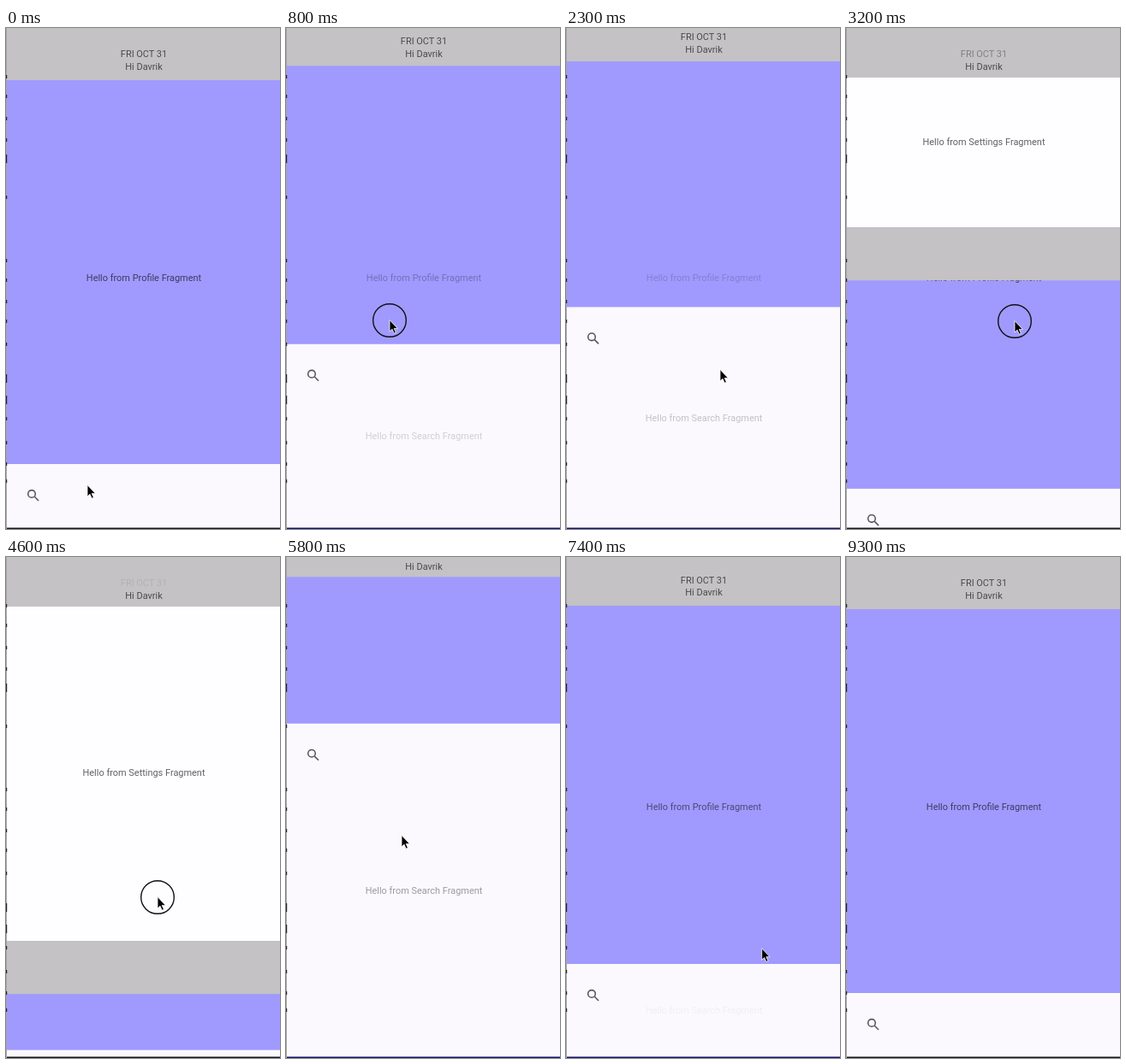
These frames come from a looping animation (320 px wide and 586 px high, 9700 ms). An HTML page:

```html
<!DOCTYPE html>
<html lang="en">
<head>
<meta charset="utf-8">
<title>Sliding panels</title>
<style>
  html, body { margin: 0; width: 100%; height: 100%; overflow: hidden; background: #fbf9fd; }
  svg { display: block; width: 320px; height: 586px; }
  text { font: 10.95px Roboto, sans-serif; text-anchor: middle; fill: #000; fill-opacity: .62; }
</style>
</head>
<body>
<svg viewBox="0 0 320 586">
  <rect width="320" height="586" fill="#a09aff"/>
  <text id="profileText" x="161" y="296">Hello from Profile Fragment</text>

  <g id="settings">
    <rect id="settingsSheet" width="320" fill="#fefdff"/>
    <text id="settingsText" x="161">Hello from Settings Fragment</text>
  </g>
  <rect id="handle" width="320" height="62" fill="#c4c2c4"/>
  <rect id="headerBar" width="320" height="58" fill="#c4c2c4"/>
  <g id="headerText">
    <text id="date" x="161" y="34.3">FRI OCT 31</text>
    <text x="161" y="49">Hi Davrik</text>
  </g>

  <g id="search">
    <rect width="320" height="600" fill="#fbf9fd"/>
    <g transform="translate(22.6 27.5) scale(.78)" fill="none" stroke="#58575a" stroke-width="2">
      <circle cx="9.5" cy="9.5" r="5.5"/>
      <path d="M13.8 13.8L19.8 19.8"/>
    </g>
  </g>
  <text id="searchText" x="161">Hello from Search Fragment</text>

  <rect id="bottomEdge" y="584.5" width="320" height="1.5"/>
  <rect width="1" height="586" fill="#a5a4a8"/>
  <g id="edgeMarks" fill="#222"></g>

  <g id="cursor">
    <circle id="press" r="19.3" fill="none" stroke="#111" stroke-width="1.4"/>
    <path d="M0 -.5V13l3-2.8 2.2 5 2.2-1-2.2-4.8h4.2z" fill="#000" stroke="#fff" stroke-width=".8"/>
  </g>
</svg>
<script>
const LOOP = 9700, STEP = 100;
const el = Object.fromEntries([...document.querySelectorAll('[id]')].map(e => [e.id, e]));
const set = (node, attrs) => { for (const k in attrs) node.setAttribute(k, attrs[k]); };

// Keyframes: time, then one or more values.
const searchKeys = [[500, 0], [1100, .55], [1400, .933], [1600, 1], [1900, 1], [2200, .48], [2600, 0],
  [5450, 0], [5800, .618], [6150, 1], [6800, 1], [7300, .1], [7600, 0]];
const settingsKeys = [[2750, 0], [3200, .447], [3600, .93], [3800, 1], [4400, 1], [4600, .859], [5000, .25], [5300, 0]];
const cursorKeys = [[0, 95, 535], [500, 100, 534], [1100, 142, 150], [1400, 148, 83], [1900, 160, 120],
  [2300, 180, 400], [2750, 195, 130], [3200, 197, 343], [3600, 190, 490], [4350, 180, 472], [4600, 177, 398],
  [5000, 165, 200], [5400, 132, 530], [5800, 135, 326], [6300, 160, 210], [6800, 225, 130],
  [7250, 230, 420], [7700, 226, 535], [8350, 226, 535], [8700, 222, 131]];
const presses = [[600, 1150], [1900, 2250], [2750, 3400], [4400, 5000], [5450, 5700], [6800, 7250]];
const cursorShown = [[0, 6400], [6750, 8750]];

function sample(keys, t) {
  const i = keys.findIndex(k => k[0] > t);
  if (i === 0) return keys[0].slice(1);
  if (i < 0) return keys.at(-1).slice(1);
  const a = keys[i - 1], b = keys[i], f = (t - a[0]) / (b[0] - a[0]);
  return a.slice(1).map((v, n) => v + (b[n + 1] - v) * f);
}
const within = (spans, t) => spans.some(([from, to]) => t >= from && t < to);

// Clipped glyphs of the window behind, along the left border.
for (const y of [57, 80, 106, 131, 153, 198, 272, 295, 320, 343, 370, 410, 435, 457, 485, 510, 530]) {
  const mark = document.createElementNS('http://www.w3.org/2000/svg', 'rect');
  const tall = y === 153 || y === 410 || y === 435;
  set(mark, { x: 0, y: y - (tall ? 5 : 2), width: 1.2, height: tall ? 10 : 4 });
  el.edgeMarks.append(mark);
}

function draw(t) {
  const [search] = sample(searchKeys, t);
  const [settings] = sample(settingsKeys, t);
  const [x, y] = sample(cursorKeys, t);

  const handleTop = 524 * settings - 1 - 61 * search;
  set(el.handle, { y: handleTop });
  set(el.settings, { visibility: settings > 0 ? 'visible' : 'hidden' });
  set(el.settingsSheet, { height: Math.max(0, handleTop) });
  set(el.settingsText, { y: 9 + .549 * handleTop });
  set(el.headerBar, { y: -61 * search });
  set(el.headerText, { transform: `translate(0 ${-55 * search})` });
  set(el.date, { opacity: 1 - settings });
  set(el.profileText, { opacity: Math.max(0, 1 - 2 * search) });

  const searchTop = 510 - 510 * search + 81 * settings ** 1.28;
  set(el.search, { transform: `translate(0 ${searchTop})` });
  set(el.searchText, { y: (searchTop + 585) / 2 + 3.8, opacity: search });
  set(el.bottomEdge, { fill: search > 0 && search < 1 ? '#10106a' : '#16161c' });

  set(el.cursor, { transform: `translate(${x} ${y})`, visibility: within(cursorShown, t) ? 'visible' : 'hidden' });
  set(el.press, { opacity: within(presses, t) ? 1 : 0 });
}

const start = performance.now();
function frame() {
  const t = (performance.now() - start) % LOOP;
  draw(Math.floor(t / STEP) * STEP);
  requestAnimationFrame(frame);
}
frame();
</script>
</body>
</html>
```
